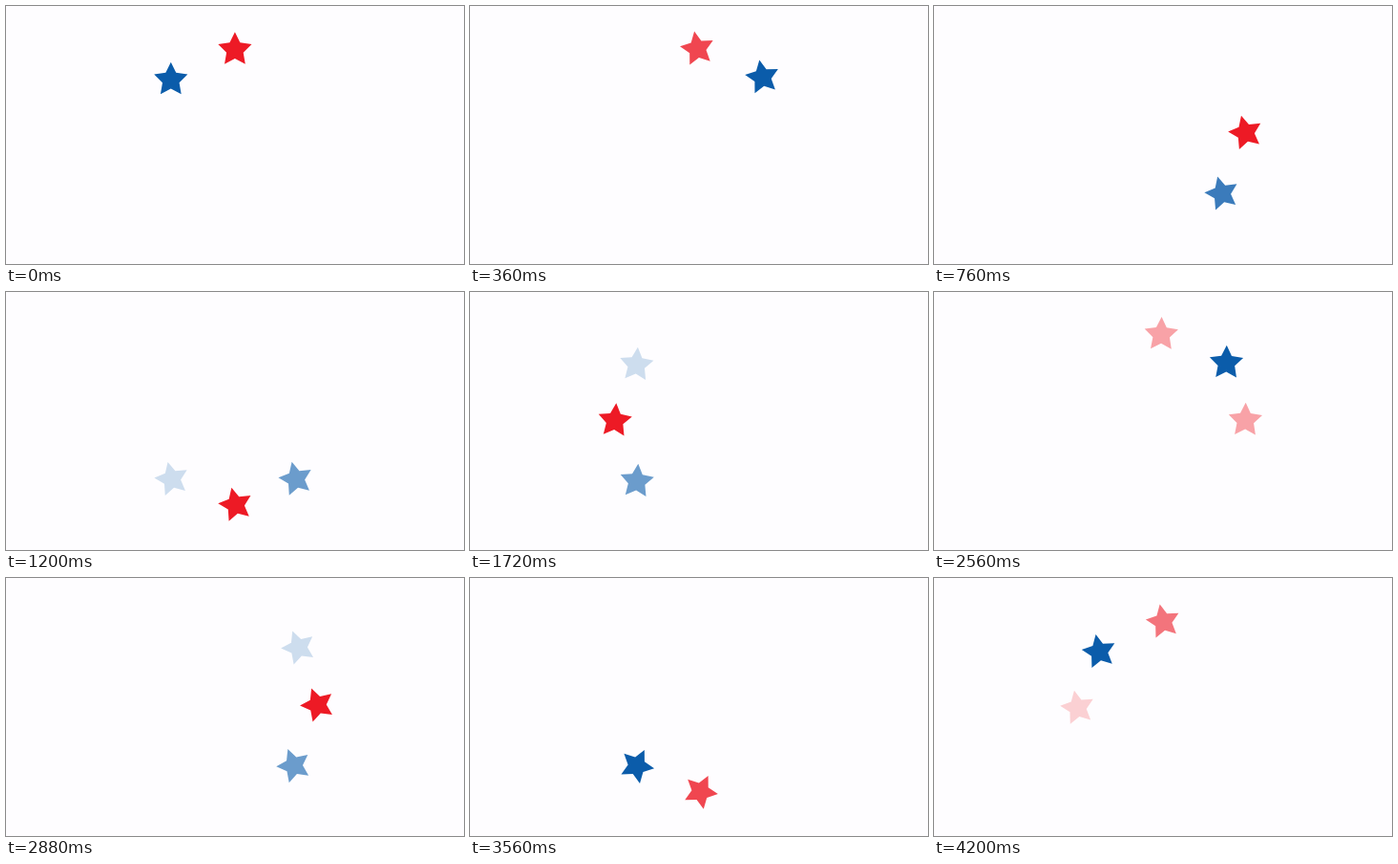
These frames come from a looping animation (480 by 270 pixels, 4.24 s). An HTML page with a canvas:

```html
<!DOCTYPE html>
<html lang="en">
<head>
<meta charset="utf-8">
<title>Star spinner</title>
<style>
  html, body { margin: 0; width: 100%; height: 100%; overflow: hidden; background: #fefdff; }
  canvas { display: block; }
</style>
</head>
<body>
<canvas id="stage" width="480" height="270"></canvas>
<script>
const ctx = document.getElementById('stage').getContext('2d');
const LOOP = 4240, STEP = 40;
const RED = '#ed1a25', BLUE = '#0b5caa', PAPER = '#fefdff';

// Pivots, clockwise from the top
const SPOTS = [
  [239.9, 44], [308.1, 73.8], [328, 133.8], [303.2, 197.4],
  [240, 224.4], [173.2, 197.5], [150.2, 134.1], [172.8, 75.5]
];
const GAP = 8;             // ticks between one star and the next
const FADE = 5;            // ticks for a fade
const HOLD = 10;           // ticks at full strength
const SPIN = Math.PI / 32; // turn per tick

// The star turns about the middle of its box, a little above its true centre
const R = 18.5, INNER = 0.5;
const DROP = R * (1 - Math.cos(Math.PI / 5)) / 2;

const star = new Path2D();
for (let i = 0; i < 10; i++) {
  const a = i * Math.PI / 5, r = i % 2 ? R * INNER : R;
  star.lineTo(r * Math.sin(a), DROP - r * Math.cos(a));
}
star.closePath();

function strength(age) {
  const fadeIn = (age + FADE) / FADE;
  const fadeOut = 1 - (age - HOLD) / FADE;
  return Math.max(0, Math.min(1, fadeIn, fadeOut));
}

function draw(time) {
  const frame = Math.floor((time % LOOP) / STEP);
  const tick = Math.round(frame * 1.2); // 30 ticks per second
  ctx.globalAlpha = 1;
  ctx.fillStyle = PAPER;
  ctx.fillRect(0, 0, 480, 270);

  for (let n = -2; n <= 17; n++) {
    const alpha = strength(tick - n * GAP);
    if (!alpha) continue;
    const [x, y] = SPOTS[(n + 8) % 8];
    ctx.save();
    ctx.translate(x, y);
    ctx.rotate(tick * SPIN);
    ctx.globalAlpha = alpha;
    ctx.fillStyle = n % 2 ? BLUE : RED;
    ctx.fill(star);
    ctx.restore();
  }
}

function loop() {
  draw(performance.now());
  requestAnimationFrame(loop);
}
draw(0);
requestAnimationFrame(loop);
</script>
</body>
</html>
```
